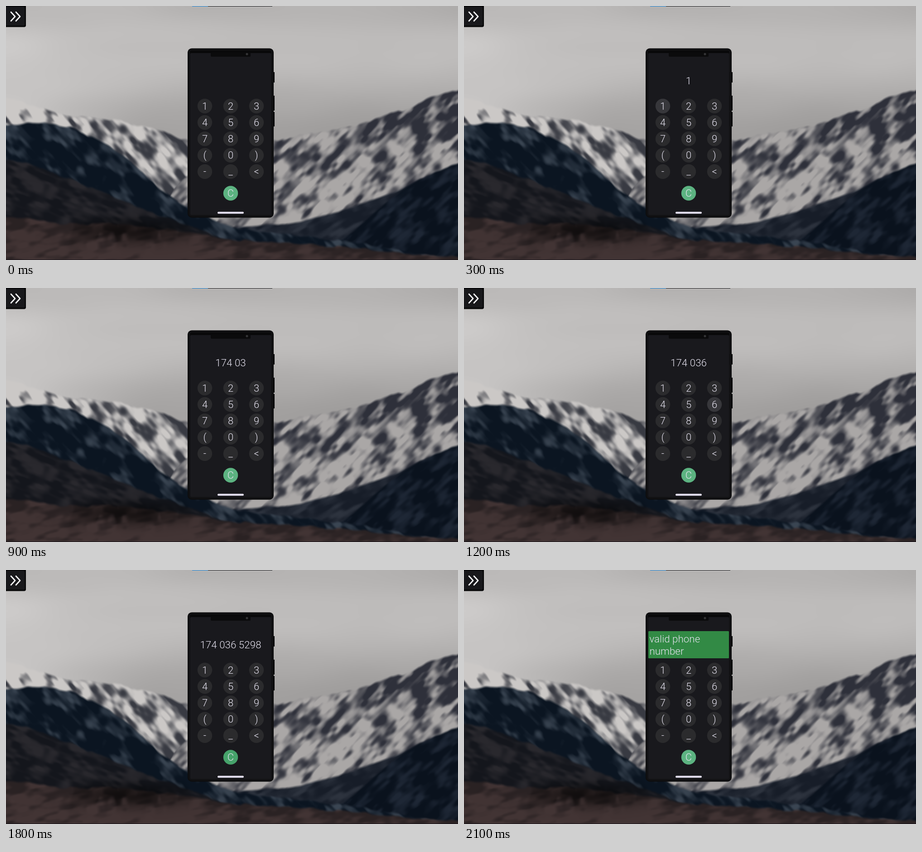
These frames come from a looping animation (998x561 px, 2400 ms). An HTML page with a canvas:

```html
<!DOCTYPE html>
<html lang="en">
<head>
<meta charset="utf-8">
<title>Phone keypad</title>
<style>
  html, body { margin: 0; width: 100%; height: 100%; overflow: hidden; background: #222; }
  canvas, svg { position: absolute; left: 0; top: 0; width: 998px; height: 561px; display: block; }
  text { font: 300 22.4px Roboto, "Liberation Sans", sans-serif; fill: #e6e3f0; }
  .key text { font-size: 22px; text-anchor: middle; }
</style>
</head>
<body>
<canvas id="scene" width="998" height="561"></canvas>
<svg id="ui" viewBox="0 0 998 561">
  <rect x="411" width="177" height="1" fill="#1b1c20"/>
  <rect x="411" width="35" height="1" fill="#1c87dc"/>

  <rect x="-8" y="-8" width="52" height="54.500" rx="4" fill="#060607"/>
  <rect x="-8" y="2" width="49.500" height="41.500" rx="3" fill="#18181b"/>
  <path d="M11 13.500L20 23.300L11 33M22 13.500L31 23.300L22 33" fill="none" stroke="#f4f4f6"
    stroke-width="2.800" stroke-linecap="round" stroke-linejoin="round"/>

  <path d="M590 146h3v23h-3zM590 198h3v33h-3zM590 234h3v32h-3z" fill="#08080a"/>
  <rect x="401" y="93.500" width="190" height="374" rx="9" fill="#0d0d0e"/>
  <rect x="403" y="96" width="186" height="369" rx="7" fill="#111113"/>
  <rect x="406" y="98" width="180" height="8" rx="3" fill="#09090a"/>
  <rect x="407" y="104" width="178" height="357.500" rx="2" fill="#19191d"/>
  <rect x="452" y="103" width="88" height="9" rx="2" fill="#0b0b0c"/>
  <circle cx="532" cy="106.300" r="2.500" fill="#353537"/>
  <rect x="467" y="454.500" width="58" height="4.300" rx="2" fill="#e5e1f1"/>

  <text id="number" x="496" y="173" text-anchor="middle"></text>
  <g id="valid" visibility="hidden">
    <rect x="407" y="135" width="178" height="60" rx="1.500" fill="#328a45"/>
    <text x="409.500" y="159.500">valid phone</text>
    <text x="409.500" y="186.500">number</text>
  </g>
</svg>
<script>
const W = 998, H = 561;
const $ = id => document.getElementById(id);

const mix = (a, b, t) => a + (b - a) * t;
const smooth = (a, b, x) => {
  const t = Math.min(1, Math.max(0, (x - a) / (b - a)));
  return t * t * (3 - 2 * t);
};
const bump = (x, mid, size) => Math.exp(-(((x - mid) / size) ** 2));
const rgb = hex => [16, 8, 0].map(s => (parseInt(hex, 16) >> s) & 255);

function hash(x, y) {
  let h = Math.imul(x, 374761393) ^ Math.imul(y, 668265263);
  h = Math.imul(h ^ (h >>> 13), 1274126177);
  return ((h ^ (h >>> 16)) >>> 0) / 4294967296;
}

function noise(x, y) {
  const i = Math.floor(x), j = Math.floor(y);
  const u = smooth(0, 1, x - i), v = smooth(0, 1, y - j);
  return mix(mix(hash(i, j), hash(i + 1, j), u), mix(hash(i, j + 1), hash(i + 1, j + 1), u), v);
}
const clouds = (x, y) => .62 * noise(x, y) + .38 * noise(x * 2 + 31, y * 2 + 17);

// Smooth curve through evenly spaced heights, one value per column, slightly rough.
function skyline(heights, rough) {
  const n = heights.length - 1;
  const at = i => heights[Math.min(n, Math.max(0, i))];
  return Array.from({ length: W }, (_, x) => {
    const p = x / W * n, i = Math.floor(p), t = p - i;
    const slope = k => (at(k + 1) - at(k - 1)) / 2;
    const y = mix(at(i), at(i + 1), smooth(0, 1, t)) +
      t * (1 - t) * ((1 - t) * slope(i) - t * slope(i + 1));
    return y + rough * (clouds(x / 24, rough) - .5);
  });
}

// cover(x, depth) is how much of the light tone lies on the slope.
function slope(heights, rough, dark, light, angle, cover) {
  return {
    top: skyline(heights, rough), dark: rgb(dark), light: rgb(light),
    cos: Math.cos(angle), sin: Math.sin(angle), cover
  };
}

const slopes = [
  slope([203, 238, 253, 286, 330, 400, 500, 600, 600], 10, "383a42", "cbc8c6", .85,
    (x, d) => .46 + .4 * bump(x, 0, 130) * (1 - smooth(25, 55, d))),
  slope([600, 600, 600, 400, 318, 292, 268, 229, 184], 12, "2e303a", "aaa7a6", -.8,
    (x, d) => mix(.54, .33, smooth(620, 960, x)) + .12 * smooth(30, 160, d)),
  slope([600, 600, 580, 530, 490, 480, 449, 404, 350], 6, "171d28", "2d333e", -.5, () => .45),
  slope([600, 600, 600, 600, 600, 590, 512, 409, 347], 6, "0a121d", "1e2735", -.7, () => .4),
  slope([262, 264, 325, 429, 486, 505, 520, 540, 561], 8, "0b1521", "3a4552", .8,
    (x, d) => mix(.4, .22, smooth(0, 130, d))),
  slope([338, 376, 427, 475, 520, 560, 600, 600, 600], 8, "14161c", "29282d", .4, () => .45),
  slope([465, 480, 482, 496, 515, 524, 533, 545, 555], 8, "2a2223", "423434", -.2,
    (x, d) => .35 + .3 * smooth(0, 50, d))
];

function sky(x, y) {
  const v = 198 - 12 * x / W
    - 34 * smooth(100, 290, y) * smooth(0, 350, x)
    - 10 * (1 - smooth(0, 80, y))
    + 14 * (clouds(x / 260, y / 90) - .5);
  return [v + 2, v, v - 1];
}

function drawScene() {
  const ctx = $("scene").getContext("2d");
  const img = ctx.createImageData(W, H);
  const soft = 4;
  for (let y = 0; y < H; y++) for (let x = 0; x < W; x++) {
    let back = slopes.length - 1;
    while (back >= 0 && y - slopes[back].top[x] < soft) back--;
    let c = back < 0 ? sky(x, y) : [0, 0, 0];

    for (let i = Math.max(0, back); i < slopes.length; i++) {
      const s = slopes[i], d = y - s.top[x];
      if (d <= -soft) continue;
      const n = clouds((x * s.cos + y * s.sin) / 34 + i * 50, (y * s.cos - x * s.sin) / 15);
      const t = smooth(.25, .75, n + s.cover(x, d) - .5), a = smooth(-soft, soft, d);
      c = c.map((v, k) => mix(v, mix(s.dark[k], s.light[k], t), a));
    }

    // Trees along the edge of the field
    if (y > 440) {
      const grove = bump(x, 265, 125) * bump(y, 498, 26) * smooth(.25, .55, clouds(x / 26, y / 44));
      c = c.map(v => v * (1 - .6 * grove));
    }
    img.data.set([...c, 255], (y * W + x) * 4);
  }
  ctx.putImageData(img, 0, 0);
  ctx.fillStyle = "#1a151b";
  ctx.fillRect(0, H - 1, W, 1);
}

const ui = $("ui");
const make = (tag, attrs, parent) => {
  const el = document.createElementNS("http://www.w3.org/2000/svg", tag);
  for (const k in attrs) el.setAttribute(k, attrs[k]);
  return parent.appendChild(el);
};

function addKey(label, x, y) {
  const key = make("g", { class: "key" }, ui);
  const disc = make("circle", { cx: x, cy: y, r: 16.2 }, key);
  make("text", { x, y: y + 7.5 }, key).textContent = label;
  return disc;
}

const keys = {};
[..."123456789(0)-_<"].forEach((label, i) => {
  keys[label] = addKey(label, 439 + 57 * (i % 3), 221 + 36.2 * Math.floor(i / 3));
});
keys.C = addKey("C", 496, 413.5);

const DIGITS = "1740365298";
const STEP = 300, LOOP = 2400, DONE = 7;
const hovers = { 1: "1", 4: "6", 6: "C" };
let shown = -1;

function typed(step) {
  if (step === 0 || step === DONE) return "";
  const d = DIGITS.slice(0, Math.round(1 + 1.8 * (step - 1)));
  return [d.slice(0, 3), d.slice(3, 6), d.slice(6)].join(" ").trim();
}

function show(step) {
  if (step === shown) return;
  shown = step;
  $("number").textContent = typed(step);
  $("valid").setAttribute("visibility", step === DONE ? "visible" : "hidden");
  for (const label in keys) {
    const over = hovers[step] === label;
    const fill = label === "C" ? (over ? "#46a36b" : "#5cb381") : (over ? "#37373b" : "#2b2b2d");
    keys[label].setAttribute("fill", fill);
  }
}

drawScene();
show(0);
const start = performance.now();
function tick() {
  show(Math.floor(((performance.now() - start) % LOOP) / STEP));
  requestAnimationFrame(tick);
}
requestAnimationFrame(tick);
</script>
</body>
</html>
```
